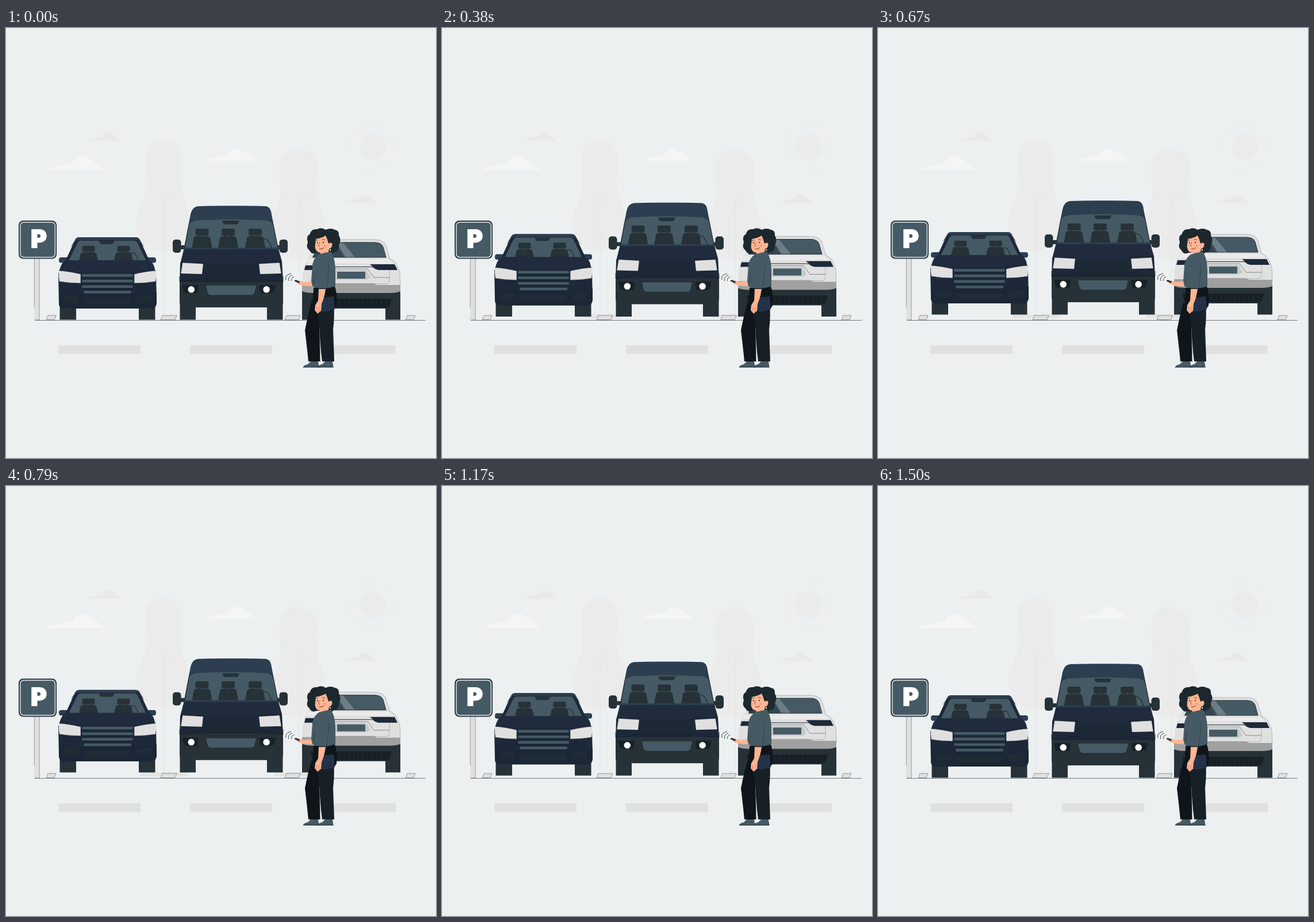
An HTML page with a canvas that plays this animation: 748 by 748 pixels, repeating every 1540 ms.

```html
<!DOCTYPE html>
<html lang="en">
<head>
<meta charset="utf-8">
<title>Parking</title>
<style>
html, body { margin: 0; width: 100%; height: 100%; overflow: hidden; background: #ecf0f1; }
canvas { display: block; width: 748px; height: 748px; }
</style>
</head>
<body>
<canvas id="stage" width="748" height="748"></canvas>
<script>
const ctx = document.getElementById('stage').getContext('2d');
const DARK = '#263238', SLATE = '#455a64', NAVY = '#2c3e50', HOOD = '#202c3e', BODY = '#1d2839',
      LIGHT = '#e0e0e0', FAINT = '#ebebeb', SKIN = '#ffb592', BLACK = '#0f151a';
const LOOP = 1540;

// Time (ms), height of the bounce (px), speed (px per ms)
const BOUNCE = [[0, 0, .008], [210, 2.8, .014], [540, 7.7, .0105], [760, 9.3, 0],
                [960, 7.4, -.0135], [1170, 3.8, -.0145], [1500, 0, -.007]];

function liftAt(t) {
  const i = BOUNCE.findIndex(key => key[0] > t);
  if (i < 1) return 0;
  const [t0, y0, v0] = BOUNCE[i - 1], [t1, y1, v1] = BOUNCE[i];
  const d = t1 - t0, u = (t - t0) / d, w = 1 - u;
  return y0 * (1 + 2 * u) * w * w + v0 * d * u * w * w +
         y1 * u * u * (3 - 2 * u) - v1 * d * u * u * w;
}

const cache = {};
const pathOf = d => cache[d] || (cache[d] = new Path2D(d));

function fill(color, d) {
  ctx.fillStyle = color;
  ctx.fill(pathOf(d));
}
function line(color, width, d) {
  ctx.strokeStyle = color;
  ctx.lineWidth = width;
  ctx.stroke(pathOf(d));
}
function box(color, x, y, w, h, r = 0) {
  ctx.fillStyle = color;
  ctx.beginPath();
  ctx.roundRect(x, y, w, h, r);
  ctx.fill();
}
function disc(color, x, y, rx, ry = rx) {
  ctx.fillStyle = color;
  ctx.beginPath();
  ctx.ellipse(x, y, rx, ry, 0, 0, 7);
  ctx.fill();
}
function at(x, y, draw, sx = 1, sy = sx) {
  ctx.save();
  ctx.translate(x, y);
  ctx.scale(sx, sy);
  draw();
  ctx.restore();
}
// Draws once as given and once mirrored about a vertical axis.
function both(axis, draw) {
  draw();
  at(2 * axis, 0, draw, -1, 1);
}

function cloud(x, y, w, h, color) {
  at(x, y, () => fill(color, 'M0 100C3 82 16 72 28 64C33 52 40 58 46 42C47 18 52 4 60 2C68-2 71 12 73 28C79 24 83 40 84 56C89 58 92 64 92 78C97 80 99 88 100 100Z'), w / 100, h / 100);
}

function sky() {
  cloud(72, 222, 99, 25, '#f5f5f5');
  cloud(348, 210, 87, 21, '#f5f5f5');
  cloud(143, 181, 56, 15, '#e8e9e9');
  cloud(588, 290, 57, 14, '#e8e9e9');
  disc(FAINT, 638, 207, 23);
  ctx.strokeStyle = '#e9eaea';
  ctx.lineWidth = .8;
  for (let i = 0; i < 18; i++) {
    const a = i * Math.PI / 9 + Math.PI / 2, near = 31 + i % 2 * 3, far = 46 + i % 3;
    ctx.beginPath();
    ctx.moveTo(638 + near * Math.cos(a), 207 - near * Math.sin(a));
    ctx.lineTo(638 + far * Math.cos(a), 207 - far * Math.sin(a));
    ctx.stroke();
  }
}

function tree(x, top, scale) {
  at(x, top, () => fill(FAINT, 'M0 0C18 0 32 15 32 40C32 60 27 74 32 96C37 116 45 125 44 149C43 177 26 204 0 204C-28 204-48 181-47 150C-46 127-35 114-31 95C-27 74-32 61-32 39C-32 14-18 0 0 0Z'), scale, .95);
  line('#e1e3e3', .8, `M${x + 1} 288V498M${x + 1} 312l11-14v-7M${x + 12} 298l-7-5M${x + 1} 326l-7-8`);
}

function curb(x, w) {
  fill(LIGHT, `M${x} 507.5L${x + 3} 500H${x + w}L${x + w - 3} 507.5Z`);
  line('#59646a', .6, `M${x} 507.5L${x + 3} 500H${x + w}L${x + w - 3} 507.5Z`);
}

function ground(lift) {
  if (lift > 5) {
    box('#e3e4e4', 234, 498, 82, 7, 2);
    box('#e3e4e4', 467, 498, 60, 7, 2);
  }
  curb(70, 17);
  curb(269, 28);
  curb(485, 27);
  curb(695, 17);
  box('#4a555b', 50, 508, 680, .7);
  for (const x of [91, 320, 535]) box(LIGHT, x, 552, 143, 15);
}

function sign() {
  box(LIGHT, 49, 400, 9, 108);
  line('#59646a', .6, 'M49.3 401V486M58 401V508H50');
  box(DARK, 22, 335, 66, 66.5, 8);
  box(SLATE, 23.5, 336.5, 63, 63.5, 7);
  ctx.strokeStyle = ctx.fillStyle = '#fff';
  ctx.lineWidth = 1.2;
  ctx.beginPath();
  ctx.roundRect(24.8, 337.8, 60.6, 61, 6);
  ctx.stroke();
  ctx.font = '900 42px Inter, sans-serif';
  ctx.textAlign = 'center';
  ctx.textBaseline = 'alphabetic';
  ctx.lineWidth = 2;
  ctx.fillText('P', 57, 382);
  ctx.strokeText('P', 57, 382);
}

function seat(x, y, headW, seatW, headH, seatH) {
  box(DARK, x - headW / 2, y, headW, headH, 3);
  box(DARK, x - 6, y + headH - 1, 2, 4);
  box(DARK, x + 4, y + headH - 1, 2, 4);
  const h = seatW / 2, top = y + headH + 1, end = top + seatH;
  fill(DARK, `M${x - h} ${end}L${x - h + 3} ${top + 4}Q${x - h + 4} ${top} ${x - h + 8} ${top}H${x + h - 8}Q${x + h - 4} ${top} ${x + h - 3} ${top + 4}L${x + h} ${end}Z`);
}

function suv() {
  const mid = 176.5;
  both(mid, () => {
    box(DARK, 93.5, 480, 28.5, 27.5);
    box(NAVY, 92, 399, 17, 9.5, 4);
  });
  fill(BODY, 'M102 408L120 369Q122 364 128 364H225Q231 364 233 369L251 408Z');
  fill(NAVY, 'M112 382L120 369Q122 364 128 364H225Q231 364 233 369L241 382L230 369H123Z');
  fill(SLATE, 'M109 405L124 374Q126 370 130 370H223Q227 370 229 374L244 405Z');
  fill(DARK, 'M161 370H189L186 375Q185 376 183 376H167Q165 376 164 375Z');
  seat(143.5, 379, 22, 34, 10, 16);
  seat(204.5, 379, 22, 34, 10, 16);
  line(DARK, 1.3, 'M213 405Q214 392 221 391Q227 392 230 405');
  fill(BODY, 'M104 404H249Q257 408 259 420L261 429L262 477Q261 488 253 488H101Q92 488 92 478L91 428L94 418Q97 408 104 404Z');
  fill(HOOD, 'M104 404H249Q256 408 258 418Q245 420 222 425H131Q108 421 95 418Q97 408 104 404Z');
  fill('#1b2636', 'M92 459Q113 463 132 463H221Q240 463 262 459V479Q261 488 253 488H101Q92 488 92 479Z');
  both(mid, () => {
    fill(LIGHT, 'M92 422Q108 423 130 428V444Q110 444 93 441Q91 432 92 422Z');
    line(DARK, .6, 'M92 422Q108 423 130 428V444Q110 444 93 441M92 454L97 462V478');
    fill('#202c35', 'M98 464L127 467L126 478L103 479Z');
  });
  fill('#1b2735', 'M132 428H221L217 463H136Z');
  for (let i = 0; i < 4; i++)
    box(SLATE, 132 + (i > 2 ? 3 : 0), 428 + i * 9.7, i > 2 ? 83 : 89, 4.7, 2);
  fill('#202c35', 'M136 470H217L214 481H139Z');
}

function van() {
  both(392, () => box(DARK, 302.5, 480, 27.5, 27.5));
  both(390, () => {
    box(DARK, 302, 378, 13, 7, 2);
    box(DARK, 290, 368, 14.5, 23, 5);
  });
  fill(NAVY, 'M334 310Q360 309 392 309.3Q430 309 452 310Q459 311 461 319L474 386L480 411H303L309 386L321 324Q324 311 334 310Z');
  fill(SLATE, 'M328 335Q392 331 456 335Q463 336 465 343L473 382H311L318 343Q320 336 328 335Z');
  line('#1d2939', 1, 'M311 382L318 343Q320 336 328 335M456 335Q463 336 465 343L473 382');
  fill(DARK, 'M376 335H406L404 340Q403 341.5 401 341.5H381Q379 341.5 378 340Z');
  for (const x of [341, 386.5, 433.5]) seat(x, 349, 23, 35, 12, 20);
  line(DARK, 1.3, 'M442 382Q444 366 451 367Q457 368 462 382');
  fill(BODY, 'M310 385H474L480 406L482 441H302L303 410Z');
  fill(HOOD, 'M310 385H474L479 405H441L434 410H349L342 407H305Z');
  fill(DARK, 'M302 441H482V477Q482 486 474 486H310Q302 486 302 477Z');
  fill('#1c2834', 'M350 414H433L435 436Q434 438 432 438H351Q349 438 348 436Z');
  line('#121b25', .7, 'M302 432V441Q325 440 343 435L350 438H434L441 435Q460 440 482 441V432M302 441H482');
  both(391.5, () => {
    fill(LIGHT, 'M307 408L343 410L341 428L304 427Z');
    line('#121b25', .6, 'M304 427L307 408L343 410');
  });
  both(387.7, () => {
    fill('#182126', 'M306 447H335L333 461H315Q310 461 309 457Z');
    disc('#fff', 322.3, 454.8, 5.8);
  });
  fill(SLATE, 'M350 448H433Q435 448 435 451L433 460Q431 465 426 465H357Q352 465 350 460L348 451Q348 448 350 448Z');
  line('#1a242a', .8, 'M348 451L350 460Q352 465 357 465H426Q431 465 433 460L435 451');
}

function hatchback() {
  both(600.5, () => box(DARK, 515, 480, 26, 27.5));
  fill(LIGHT, 'M524 405L540 373Q544 368 552 368H640Q656 368 660 377L668 402Z');
  line('#89949a', .6, 'M560 368H640Q656 368 660 377L668 402');
  fill(SLATE, 'M547 373H641Q653 373 656 381L661 399H533Z');
  fill('#6d7d85', 'M575 373H586L607 399H591Z');
  fill('#344650', 'M547 373H573L588 399H533Z');
  line(DARK, 1, 'M533 399H661L656 381Q653 373 641 373H560');
  fill(LIGHT, 'M525 401H667Q676 404 680 412L685 425L686 449H515L516 426L520 411Z');
  line('#8c969b', .6, 'M667 401Q676 404 680 412L685 425L686 449M667 421V439Q666 445 661 445H560');
  fill('#ebebeb', 'M526 402H666L672 409H521Z');
  fill(BODY, 'M521 413H547L551 415H638L633 411H676L681 421H648Q642 420 638 416H550L546 421H519Z');
  line('#59646a', .7, 'M572 419H629L640 434H667M572 419L566 434H534');
  fill('#c6c8c9', 'M574 421H627L634 434L627 438H572Z');
  box(SLATE, 576, 424, 49, 12, 1);
  fill('#a0a0a0', 'M515 446H560L566 444H640L646 447H686V459L672 463H528L515 459Z');
  fill(DARK, 'M515 458Q522 461 534 461H668Q679 461 686 458V478Q685 488 676 488H524Q516 488 515 478Z');
  fill('#172026', 'M530 471H671L668 482Q667 486 662 486H538Q533 486 532 482Z');
  for (let x = 540; x < 666; x += 8) box('#232e34', x, 474, 1, 9);
}

function woman() {
  // Legs and shoes
  fill(BLACK, 'M531 478H548L545 505L546.5 580H526Q523 550 520 526Q525 500 531 478Z');
  fill('#172027', 'M542 480H570Q572 500 569 525L571 580H550Q546 550 545.5 525L542 496Z');
  for (const x of [517, 542]) {
    fill(SLATE, `M${x + 13} 580H${x + 26}L${x + 27.5} 590H${x}Q${x + 1} 586 ${x + 8} 585Z`);
    box(DARK, x, 589, 27.5, 1.5);
  }
  // Extended arm with the key
  fill(SKIN, 'M536 440L518 442L510 439L504 441L506 444L512 447Q526 450 537 449Z');
  fill(DARK, 'M501 440L504 438L511 441L510 444Z');
  line(DARK, .9, 'M501 433Q496 434 496.5 440M498 430Q490 432 491.5 440M496 427Q484 430 487 438');
  // Waist, bag and shirt
  fill(BLACK, 'M535 452L571 447Q577 460 575 483L568 493H533Z');
  fill('#243247', 'M546 469L570 467L572 489Q565 494 547 493Z');
  fill(SLATE, 'M544 394L565 390Q572 398 573 420L573 449Q555 456 536 451L533 449L531 440L533 412Q535 400 544 394Z');
  line('#2b3a42', .7, 'M545 395L567 396M561 412Q562 430 557 455L543 454M537 426L535 446');
  fill(SKIN, 'M544 454H556Q554 469 549 480L548 492L542 497L537 491L538 482L543 474Z');
  line('#b96f56', .6, 'M541 485L540 494M545 485L544 496');
  // Hair and face
  fill('#1c282e', 'M529 358Q531 349 541 350Q549 346 556 351Q565 347 572 351Q580 352 579 361Q584 369 579 377Q580 389 570 390Q563 398 556 391L540 391Q532 395 528 387Q521 382 525 373Q521 363 529 358Z');
  fill(SKIN, 'M539 367Q550 365 556 361Q559 367 561 375Q567 371 567.5 377Q567 383 562 384Q561 390 560 394L547 396L547 391Q538 390 537.5 380Z');
  fill(SLATE, 'M544 394Q556 390 566 389L568 397L545 399Z');
  disc(DARK, 542, 373.5, .9, 1.3);
  disc(DARK, 552, 373, .9, 1.3);
  line(DARK, .8, 'M539 370Q541 368 543 369M550 368Q552 367 555 369');
  line('#8f4f40', .8, 'M546 373L543.5 379L546 380');
  line('#6b302a', 1, 'M545 384Q549 386 553 382');
  disc('#f7957c', 555, 379, 2.2, 1.5);
  disc('#fff', 564, 386, 1.2);
}

function draw(now) {
  const lift = liftAt(now % LOOP);
  box('#ecf0f1', 0, 0, 748, 748);
  sky();
  tree(274, 195, 1);
  tree(509, 210, 1.06);
  ground(lift);
  at(0, -lift, () => { suv(); van(); hatchback(); });
  sign();
  woman();
}

const start = performance.now();
function tick() {
  draw(performance.now() - start);
  requestAnimationFrame(tick);
}
tick();
</script>
</body>
</html>
```
